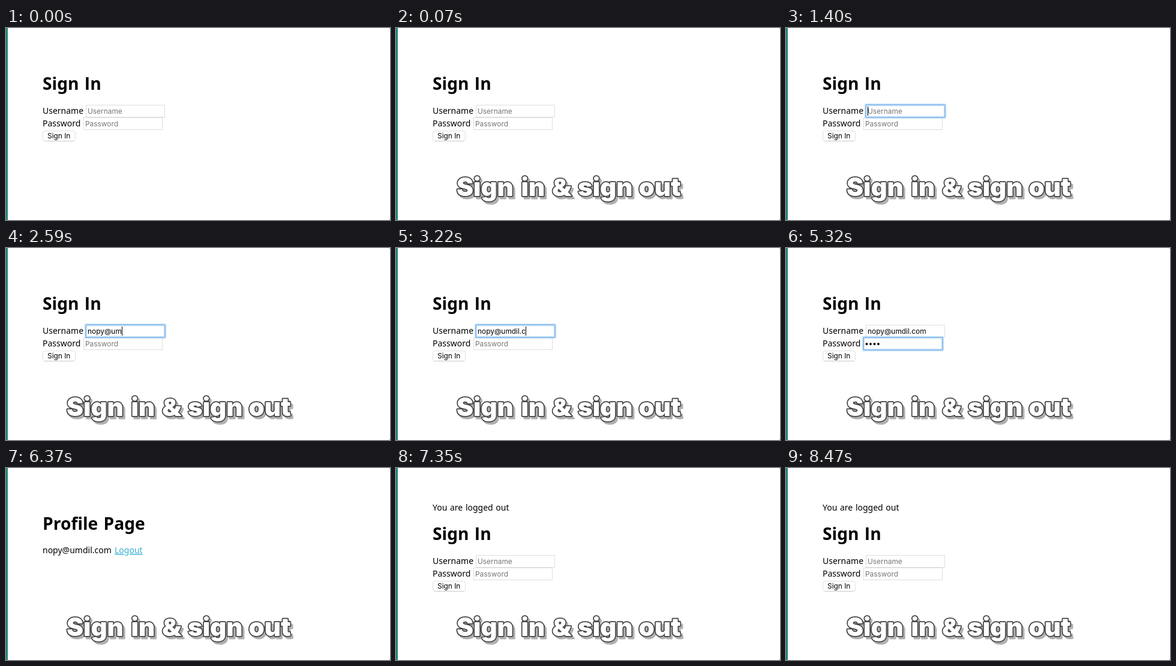
An HTML page that plays this animation: 640x320 px, repeating every 8.96 s.

```html
<!DOCTYPE html>
<html lang="en">
<head>
<meta charset="utf-8">
<title>Sign in and sign out</title>
<style>
  html, body { margin: 0; width: 100%; height: 100%; overflow: hidden; background: #fff; }
  svg { display: block; }
  text { font: 500 14px "Noto Sans", sans-serif; fill: #000; white-space: pre; word-spacing: 1px; }
  .head { font-size: 28.2px; font-weight: 700; word-spacing: 2px; }
  .plain { font-family: "Open Sans", sans-serif; }
  .ui { font: 11.9px Inter, sans-serif; word-spacing: 0; }
  .hint { fill: #777; }
  .dots { font: 14px "Liberation Sans", Arial, sans-serif; letter-spacing: 1.6px; }
  .link { fill: #35afd0; text-decoration: underline; }
  .box { fill: #fff; stroke: #dedede; }
  .glow { fill: none; stroke: #8dbfee; }
  .title text { font: 900 42px Inter, sans-serif; stroke-linejoin: round; paint-order: stroke; }
  .title .and { font: 800 41px "Open Sans", sans-serif; }
  .title .shade { fill: #b0b0b0; stroke: #b0b0b0; stroke-width: 3px; }
  .title .face { fill: #fff; stroke: #444; stroke-width: 3.4px; }
</style>
</head>
<body>
<svg width="640" height="320" viewBox="0 0 640 320">
  <rect width="640" height="320" fill="#23877a"/>
  <path d="M3 0H638Q640 0 640 2V318Q640 320 638 320H3Z" fill="#fff"/>

  <text id="notice" x="61" y="71">You are logged out</text>

  <g id="form">
    <text class="head" x="61" y="103">Sign <tspan class="plain">I</tspan>n</text>
    <text x="61" y="143">Username</text>
    <text x="61" y="164">Password</text>
    <rect class="box" x="133.5" y="128.5" width="131" height="20"/>
    <rect class="box" x="129.5" y="149.5" width="131" height="20"/>
    <g id="ring">
      <rect class="glow" x="133" y="128" width="132" height="21" rx="1.5" stroke-width="5" opacity=".35"/>
      <rect class="glow" x="133" y="128" width="132" height="21" rx="1" stroke-width="2"/>
    </g>
    <text id="user" class="ui" x="136" y="143"></text>
    <text id="pass" class="ui" x="132" y="164"></text>
    <path id="caret" d="M.5 131V146" stroke="#000"/>
    <rect x="61.5" y="171.5" width="54" height="17" rx="3.5" fill="#fff" stroke="#e0e0e0"/>
    <path d="M64 188.5H113" stroke="#cacaca"/>
    <text class="ui" x="69" y="184">Sign In</text>
  </g>

  <g id="profile">
    <text class="head" x="61" y="103">Profile Page</text>
    <text id="mail" x="61" y="142"></text>
    <text class="link" x="181" y="142">Logout</text>
  </g>

  <g id="title" class="title"></g>
</svg>
<script>
  const LOOP = 8960, MAIL = "nopy@umdil.com";
  // [time, characters typed so far]
  const userKeys = [[1610, 1], [1680, 2], [1820, 3], [1890, 4], [2310, 5], [2520, 6], [2590, 7],
    [2800, 8], [2870, 10], [3080, 11], [3220, 12], [3360, 14]];
  const passKeys = [[4200, 1], [4410, 2], [4480, 3], [4550, 4]];
  const words = [["Sign", 101], ["in", 208.5], ["&amp;", 260, "and"], ["sign", 303], ["out", 404.5]];

  const el = id => document.getElementById(id);
  const show = (id, on) => el(id).style.display = on ? "" : "none";
  const typed = (keys, t) => keys.reduce((n, [at, count]) => t >= at ? count : n, 0);

  const spans = words.map(([word, x, style = ""]) =>
    `<tspan x="${x}" class="${style}">${word}</tspan>`).join("");
  el("title").innerHTML =
    `<text class="shade" y="280" transform="translate(3.5 3.5)">${spans}</text>` +
    `<text class="face" y="280">${spans}</text>`;
  el("mail").textContent = MAIL;

  function setField(id, value, hint, style) {
    const field = el(id);
    field.textContent = value || hint;
    field.setAttribute("class", "ui " + (value ? style : "hint"));
    return value ? field.getComputedTextLength() : 0;
  }

  function draw(t) {
    const onProfile = t >= 5670 && t < 7350, out = t >= 7350;
    const inUser = t >= 1400 && t < 3780, inPass = t >= 3780 && t < 5670;
    show("title", t >= 70);
    show("notice", out);
    show("form", !onProfile);
    show("profile", onProfile);
    show("ring", inUser || inPass);
    show("caret", inUser || inPass && t < 5110);
    el("form").setAttribute("transform", `translate(0 ${out ? 17 : 0})`);
    el("ring").setAttribute("transform", inPass ? "translate(-4 21)" : "");
    if (onProfile) return;

    const dots = out ? 0 : typed(passKeys, t);
    const userWidth = setField("user", out ? "" : MAIL.slice(0, typed(userKeys, t)), "Username", "");
    const passWidth = setField("pass", "•".repeat(dots), "Password", "dots");
    el("pass").setAttribute("y", dots ? 165.2 : 164);
    const x = Math.round(inPass ? 132 + passWidth : 136 + userWidth);
    el("caret").setAttribute("transform", `translate(${x} ${inPass ? 21 : 0})`);
  }

  const start = performance.now();
  function tick() {
    draw((performance.now() - start) % LOOP);
    requestAnimationFrame(tick);
  }
  tick();
</script>
</body>
</html>
```
